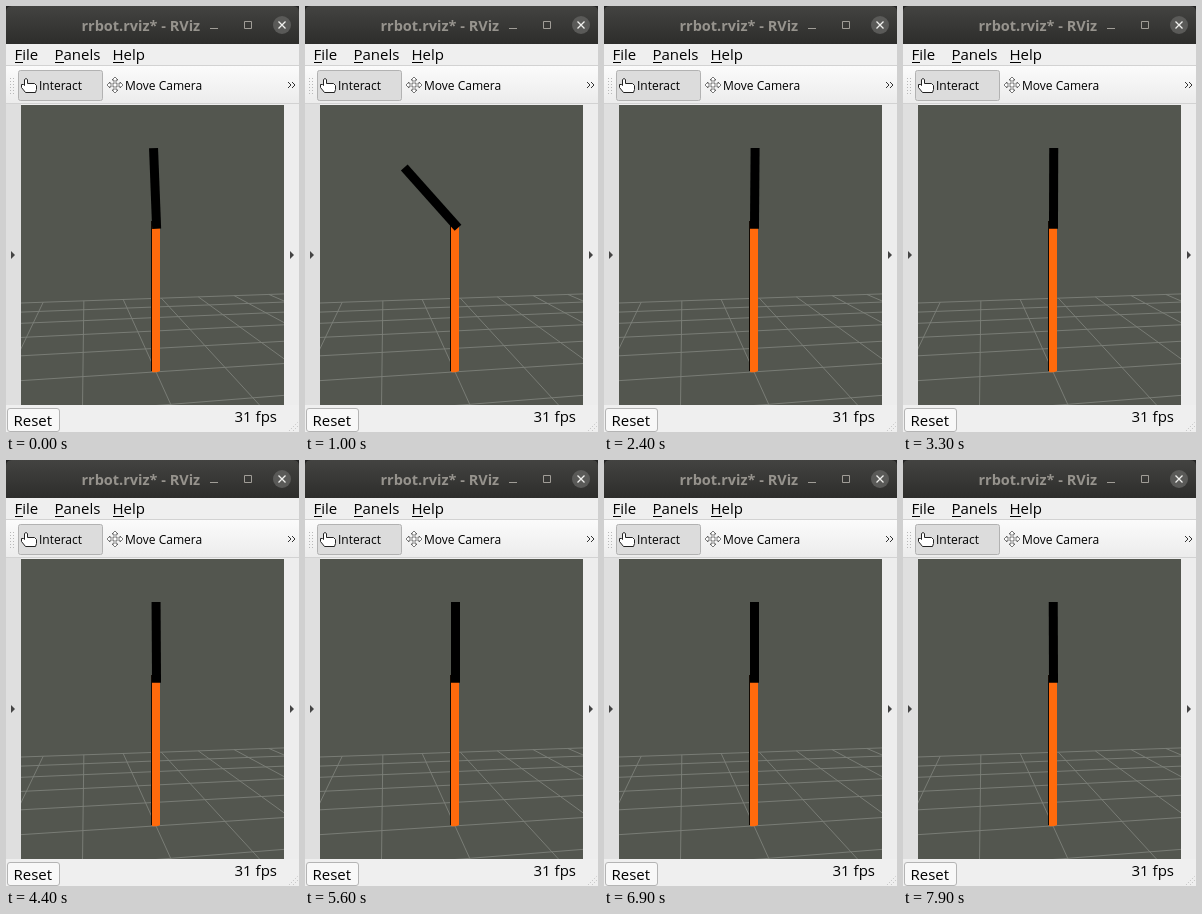
These frames come from a looping animation (293 px wide and 426 px high, 8000 ms). An HTML page:

```html
<!DOCTYPE html>
<html lang="en">
<head>
<meta charset="utf-8">
<title>rrbot</title>
<style>
  html, body { margin: 0; width: 100%; height: 100%; overflow: hidden; background: #efefef; }
  svg { display: block; width: 293px; height: 426px; }
  text { font-family: "Open Sans", "Noto Sans", sans-serif; font-size: 15px; fill: #000; }
  .small { font-size: 12px; }
  .title { font-size: 14.5px; font-weight: 700; fill: #96938d; }
  .icon { fill: #fff; stroke: #222; stroke-linejoin: round; }
</style>
</head>
<body>
<svg viewBox="0 0 293 426">
  <defs>
    <clipPath id="view"><rect x="15" y="99" width="263" height="300"/></clipPath>
    <linearGradient id="bar" x2="0" y2="1">
      <stop stop-color="#434341"/><stop offset="1" stop-color="#2d2d2b"/>
    </linearGradient>
    <linearGradient id="tools" x2="0" y2="1">
      <stop stop-color="#fbfbfb"/><stop offset="1" stop-color="#ececec"/>
    </linearGradient>
  </defs>

  <!-- title bar -->
  <rect width="293" height="38" fill="#222"/>
  <path d="M0 38V6q0-6 6-6h281q6 0 6 6v32z" fill="url(#bar)"/>
  <text class="title" x="75.500" y="25">rrbot.rviz* - RViz</text>
  <path d="M204 22.500h8M238.500 15.500h7v7h-7z" fill="none" stroke="#a09d97"/>
  <circle cx="276" cy="19" r="9" fill="#5a5a58"/>
  <path d="M272.500 15.500l7 7m0-7l-7 7" stroke="#f0f0ee" stroke-width="1.3"/>

  <!-- menu -->
  <text x="8.500" y="54">File</text>
  <text x="48.500" y="54">Panels</text>
  <text x="106.500" y="54">Help</text>
  <path d="M9 56.500h8M49 56.500h9M107 56.500h11" stroke="#000"/>

  <!-- toolbar -->
  <rect y="60" width="293" height="37" fill="url(#tools)"/>
  <path d="M0 59.500h293M0 97.500h293" stroke="#d2d2d2"/>
  <path d="M4.500 72v16M7.500 72v16" stroke="#b8b8b8" stroke-dasharray="1 2"/>
  <rect x="12.500" y="64.500" width="84" height="30" rx="2" fill="#dcdcdc" stroke="#b2b2b2"/>
  <path class="icon" d="M19.500 86.500l-4-5v-3h2l1 1v-6q1.500-2 3 0v4h7l2 2v4l-1 3z"/>
  <text class="small" x="33" y="84">Interact</text>
  <path class="icon" d="M109 71l3 3h-2v4h4v-2l3 3-3 3v-2h-4v4h2l-3 3-3-3h2v-4h-4v2l-3-3 3-3v2h4v-4h-2z" stroke-width=".6"/>
  <text class="small" x="119" y="84">Move Camera</text>
  <path d="M282 76l3 3-3 3m4-6l3 3-3 3" fill="none" stroke="#333"/>

  <!-- side handles -->
  <rect y="98" width="15" height="301" fill="#dfdfdf"/>
  <rect x="278" y="98" width="15" height="301" fill="#ededed"/>
  <path d="M5 245l4 4-4 4zM284 245l4 4-4 4z" fill="#444"/>

  <!-- scene -->
  <g clip-path="url(#view)">
    <rect x="15" y="99" width="263" height="300" fill="#53564f"/>
    <path id="grid" fill="none" stroke="#7d807a" stroke-width=".9"/>
    <path d="M145 215h3v150h-3z" fill="#120a04"/>
    <path d="M146 220h8v145q-3 2-8 1z" fill="#ff6a0c"/>
    <path id="arm" d="M146 142h9v80.800h-9z"/>
  </g>

  <!-- status -->
  <rect x="1.500" y="402.500" width="52" height="23" rx="2.500" fill="#f8f8f8" stroke="#b4b4b4"/>
  <text x="7.500" y="420">Reset</text>
  <text x="228.500" y="416">31 fps</text>
  <path d="M283 425l9-9M287 425l5-5" stroke="#bbb" stroke-dasharray="1 2"/>
</svg>
<script>
const LOOP = 8000, STEP = 100;
const arm = document.getElementById('arm');

// Ground plane seen by a slightly turned camera
const yaw = 0.17, s = Math.sin(yaw), c = Math.cos(yaw);
function project(u, v) {
  const depth = 5.75 + u * s + v * c;
  return `${150 + 414 * (u * c - v * s) / depth} ${209 + 902 / depth}`;
}
const line = (u1, v1, u2, v2) => `M${project(u1, v1)}L${project(u2, v2)}`;
let grid = '';
for (let v = -2; v <= 5; v++) grid += line(-5, v, 5, v);
for (let u = -5; u <= 5; u++) grid += line(u, -3, u, 5);
document.getElementById('grid').setAttribute('d', grid);

// Each kick [time, degrees] throws the arm off, then it settles upright
const kicks = [
  [0, -2.2], [1000, -41.7], [1900, 66], [2800, 26.5],
  [4100, -6.7], [5700, 187.5], [6400, -3], [7400, -29.3]
];
function angleAt(t) {
  const [start, size] = kicks.filter(k => k[0] <= t).pop();
  return size * Math.exp((start - t) / STEP);
}

function draw(now) {
  const t = Math.floor(now % LOOP / STEP) * STEP;
  arm.setAttribute('transform', `rotate(${angleAt(t)} 150.5 219)`);
  requestAnimationFrame(draw);
}
draw(performance.now());
</script>
</body>
</html>
```
